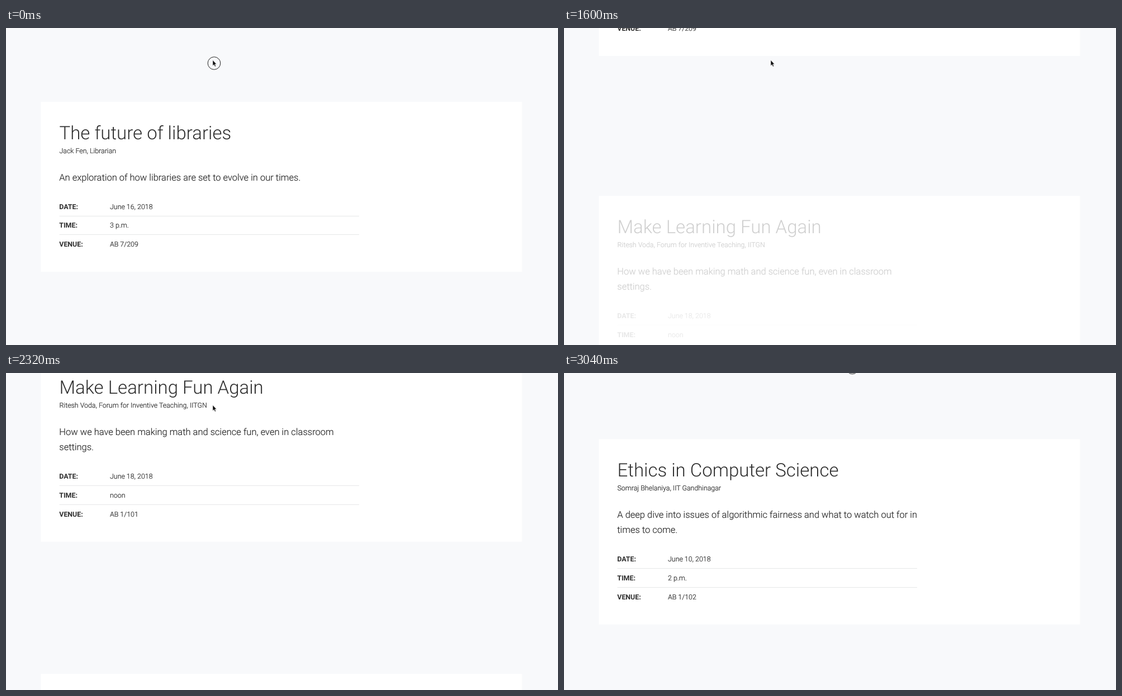
An HTML page for the animation above (3.12 s loop, 988 by 567 pixels).

```html
<!DOCTYPE html>
<html lang="en">
<head>
<meta charset="utf-8">
<title>Talks</title>
<style>
  html, body { margin: 0; width: 100%; height: 100%; overflow: hidden; background: #f8f9fb; }
  svg { display: block; font: 300 12.4px Roboto, sans-serif; fill: #2d2d2d; }
  text { text-rendering: geometricPrecision; stroke: #2d2d2d; stroke-width: .22px; }
  .title { font-size: 33px; stroke: none; }
  .blurb { font-size: 16.5px; }
  .label { font-weight: 700; stroke: none; }
</style>
</head>
<body>
<svg width="988" height="567" viewBox="0 0 988 567">
  <g id="deck"></g>
  <g id="pointer">
    <circle id="ring" cx="2.5" cy="5.5" r="11.3" fill="none" stroke="#222"/>
    <path d="M0 0v10l2.3-2.1 1.6 3.7 1.7-.7-1.6-3.6h2.9z" fill="#111" stroke="#fff" stroke-width=".5"/>
  </g>
</svg>
<script>
const LOOP = 3120, STEP = 80, PITCH = 568, SCROLL = 275, LINE = 27.5;
const STARTS = [1435, 2220.7];   // when each page turn begins
const talks = [
  { title: 'The future of libraries', by: 'Jack Fen, Librarian',
    blurb: ['An exploration of how libraries are set to evolve in our times.'],
    facts: ['June 16, 2018', '3 p.m.', 'AB 7/209'] },
  { title: 'Make Learning Fun Again', by: 'Ritesh Voda, Forum for Inventive Teaching, IITGN',
    blurb: ['How we have been making math and science fun, even in classroom', 'settings.'],
    facts: ['June 18, 2018', 'noon', 'AB 1/101'] },
  { title: 'Ethics in Computer Science', by: 'Somraj Bhelaniya, IIT Gandhinagar',
    blurb: ['A deep dive into issues of algorithmic fairness and what to watch out for in', 'times to come.'],
    facts: ['June 10, 2018', '2 p.m.', 'AB 1/102'] }
];

const $ = id => document.getElementById(id);
const clamp = x => Math.min(1, Math.max(0, x));
const easeInOut = x => x < .5 ? 2 * x * x : 1 - 2 * (1 - x) ** 2;
const text = (x, y, kind, str) => `<text x="${x}" y="${y}" class="${kind}">${str}</text>`;

function slide({ title, by, blurb, facts }, i) {
  const height = 276.5 + LINE * blurb.length;
  const top = i * PITCH + (PITCH - height) / 2;
  const rows = top + 164 + LINE * blurb.length;
  const row = (fact, k) => {
    const y = rows + 33.7 * k;
    const rule = k ? `<rect x="95.5" y="${Math.round(y - 21.5)}" width="536.5" height="1" fill="#e6e7e8"/>` : '';
    return rule + text(95.3, y, 'label', ['DATE:', 'TIME:', 'VENUE:'][k]) + text(186, y, '', fact);
  };
  return `<rect x="62.5" y="${top}" width="861" height="${height}" fill="#fff"/>
    <g class="head">${text(95.5, top + 66.6, 'title', title)}${text(95.5, top + 92.2, '', by)}
    ${blurb.map((s, k) => text(95.3, top + 140.6 + LINE * k, 'blurb', s)).join('')}</g>
    <g class="rows">${facts.map(row).join('')}</g>`;
}

$('deck').innerHTML = talks.map(slide).join('');
const heads = document.querySelectorAll('.head'), tables = document.querySelectorAll('.rows');

function draw(now) {
  const t = Math.floor(now % LOOP / STEP) * STEP;
  let shift = 0;
  STARTS.forEach((start, i) => {
    shift += PITCH * easeInOut(clamp((t - start) / SCROLL));
    const shown = clamp((t - start - 120) / 200);
    heads[i + 1].style.opacity = shown;
    tables[i + 1].style.opacity = shown ** 1.5;
  });
  $('deck').setAttribute('transform', `translate(0 ${-Math.floor(shift * 2) / 2})`);

  const leave = easeInOut(clamp((t - 2720) / 320));
  $('pointer').setAttribute('transform', `translate(${370 + 143.5 * leave} ${57.5 - 72.5 * leave})`);
  $('ring').style.display = t < 400 || t >= 3040 ? '' : 'none';
}

const begin = performance.now();
(function tick() {
  draw(performance.now() - begin);
  requestAnimationFrame(tick);
})();
</script>
</body>
</html>
```
